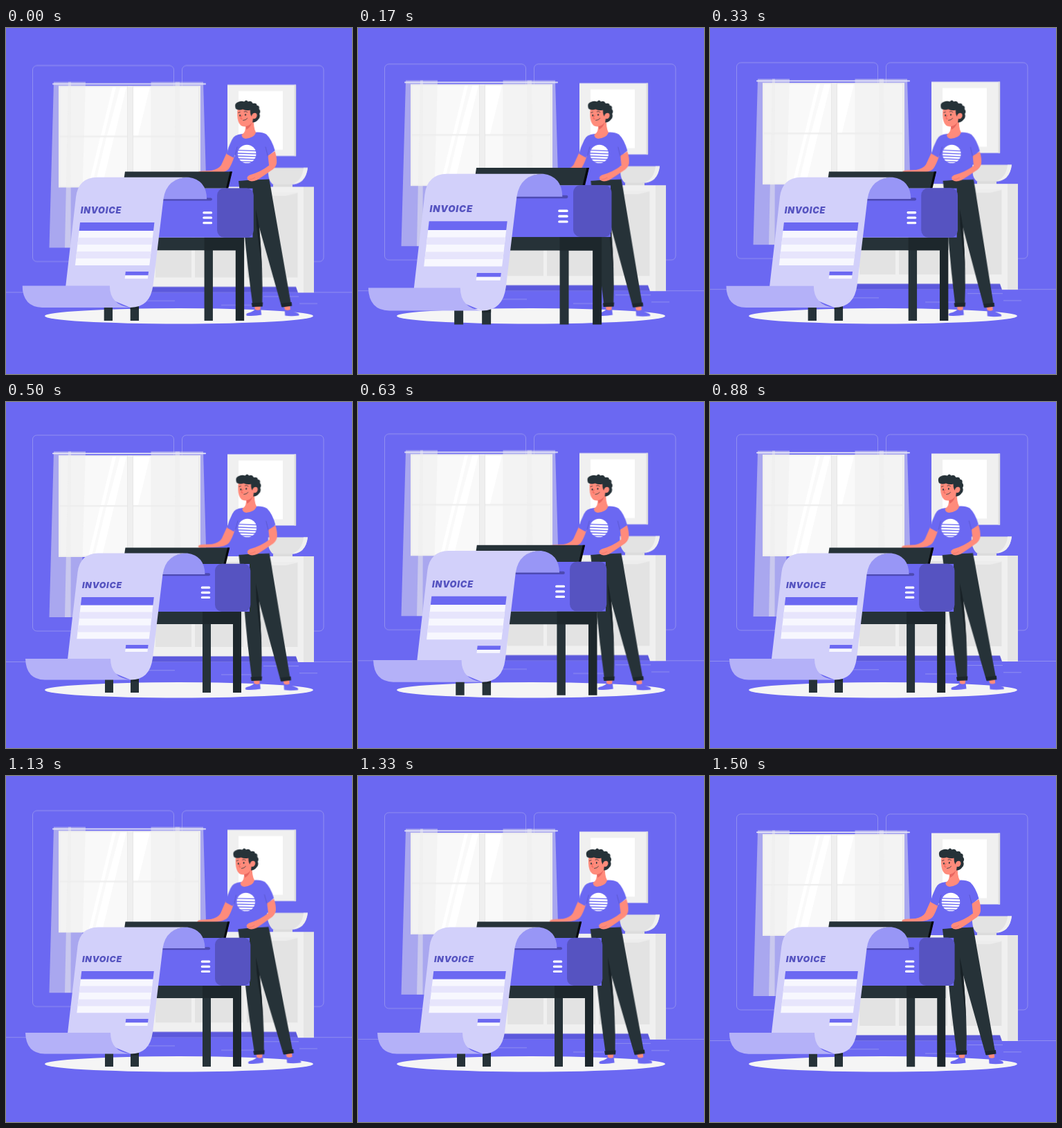
Recreate the animation shown at these times as an HTML page. Size 500 by 500 pixels, loop 1.54 s.

```html
<!DOCTYPE html>
<html lang="en">
<head>
<meta charset="utf-8">
<title>Invoice printing</title>
<style>
  html, body { margin: 0; width: 100%; height: 100%; overflow: hidden; background: #6b68f2; }
  svg { display: block; width: 100vw; height: 100vh; }
  .room, .man, .printer { animation: 1540ms linear -41.6ms infinite; }
  .room { animation-name: float; }
  .man { animation-name: sway; transform-origin: 351px 260px; }
  .printer { animation-name: beat; transform-origin: 190.5px 315px; }
  @keyframes float {
    0%, 100% { transform: translateY(0); }
    50% { transform: translateY(-10px); }
  }
  @keyframes sway {
    0%, 100% { transform: rotate(0deg); }
    25% { transform: rotate(1deg); }
    75% { transform: rotate(-1deg); }
  }
  @keyframes beat {
    0%, 30%, 40%, 60%, 100% { transform: scale(1); }
    10%, 50% { transform: scale(1.1); }
  }
  .line { fill: none; stroke: #ebebeb; stroke-width: .6; stroke-opacity: .5; }
  .curtain { fill: #ededed; fill-opacity: .48; }
  .purple { fill: #6b68f2; }
  .skin { fill: #ff8b7b; }
  .dark { fill: #263238; }
  .deep { fill: #1d272c; }
  .ink { fill: none; stroke: #263238; stroke-width: .8; stroke-linecap: round; }
  .fold { fill: none; stroke: #4f4cb8; stroke-width: .6; stroke-linecap: round; }
  .white { fill: #fff; }
  .title { font: italic 900 12.4px Inter, Arial, sans-serif; letter-spacing: .75px; fill: #5553c0; }
</style>
</head>
<body>
<svg viewBox="0 0 500 500" preserveAspectRatio="none">
  <rect class="purple" width="500" height="500"/>

  <g class="room">
    <g class="line">
      <rect x="38.5" y="55" width="204" height="283" rx="6"/>
      <rect x="254.5" y="55" width="204.500" height="283" rx="6"/>
      <path d="M0 382.500H500M190 394.800H244M311 401H358M372 388.600H423M424 398.800H450"/>
    </g>

    <!-- window -->
    <rect x="76" y="84" width="205" height="147" fill="#efefef"/>
    <g fill="#f9f9f9">
      <path d="M78 86H175V156H78ZM184 86H278V156H184ZM78 158.500H175V229H78ZM184 158.500H278V229H184Z"/>
    </g>
    <g class="white">
      <path d="M154 86H159L142 156H137ZM165 86H174L157 156H146ZM136 158.500H141L124 229H119ZM145 158.500H156L139 229H128Z"/>
      <path d="M184 86H208L191 156H184Z"/>
    </g>
    <path d="M175.500 84V231M183.500 84V231M278.500 86V229" stroke="#e4e4e4" stroke-width=".7"/>
    <path class="curtain" d="M69 78.500H115L108 318H62.500Z"/>
    <path class="curtain" d="M90 78.500H94L93.500 318H85Z"/>
    <path class="curtain" d="M209.500 78.500H285L292 318H209.500Z"/>
    <path class="curtain" d="M244.500 78.500H251L253 318H243Z"/>
    <rect x="67" y="80.600" width="222" height="1.600" rx=".8" fill="#e9e9f6"/>

    <!-- picture -->
    <rect x="320" y="82.500" width="99" height="103" fill="#f0f0f0"/>
    <rect x="416.500" y="82.500" width="2.700" height="103" fill="#dedede"/>
    <rect class="white" x="336" y="91.500" width="64" height="85"/>

    <!-- sideboard -->
    <rect x="200" y="374" width="222" height="8.500" fill="#5c59dc"/>
    <path d="M195 230H445V383H422L419 374.500H195Z" fill="#f0f0f0"/>
    <path d="M430 230H445V383H430Z" fill="#e5e5e5"/>
    <path d="M216 238H268V361H216ZM273 238H343V361H273ZM348 238H421.500V361H348Z" fill="#e3e3e3"/>
    <path d="M378 238H421.500V239L405 243H378Z" fill="#ededed"/>

    <!-- bowl -->
    <path d="M386 230V226.500Q400 223 414 226.500V230Z" fill="#dcdcdc"/>
    <path d="M376 202.500H436Q433 226.500 412 226.500H386Q379 222 376 202.500Z" fill="#e3e3e3"/>
    <path d="M430 202.500H436Q433 226.500 412 226.500Q428 222 430 202.500Z" fill="#f0f0f0"/>
  </g>

  <ellipse cx="250" cy="416.300" rx="194" ry="11.200" fill="#f5f5f5"/>

  <g class="man">
    <!-- feet -->
    <path class="skin" d="M359.500 400H368.500L367.500 409H360ZM402 400H410.500L411.500 409H403.500Z"/>
    <path class="purple" d="M368.500 406.500L369.500 414.500Q360 416.500 348 415.700Q346 412.500 351 411.500Q357 410 360 406.500Q364 409 368.500 406.500Z"/>
    <path class="purple" d="M403 406.500Q407 409 411.500 406.500Q415 410 420 411.200Q425 412.500 423.500 415.500Q412 417 403.500 415.500Z"/>
    <!-- trousers -->
    <path class="dark" d="M336 221L380 217.500Q383 232 385.500 248L412.500 401L398.500 403L366 288Q372 350 370.500 401L357 402.500Q349 345 344 290Z"/>
    <path d="M361 262Q364 275 366 288Q369 325 370 350L362 285Z" fill="#182126"/>
    <path class="deep" d="M355 397.500L371.500 396.500L371 402.500L356 403ZM397.500 398L413 396L413.500 401.500L399 403.500Z"/>
    <!-- arms and shirt -->
    <path class="skin" d="M319 180L330 185Q326 198 321.500 204Q317 209.500 300 210.500L279 211.500Q275.500 209.500 279 207.500Q285 206 297 206Q307 204 311 198Z"/>
    <path class="purple" d="M341 153Q329 154 326 162Q321 172 318.500 182L328.500 187.500L331 183Q330 205 322.500 221L380 218.500Q377 200 379 185L388.500 177Q384 161 376 153.500Q369 149.500 357 151Z"/>
    <path class="fold" d="M331 184L334 172M378.500 186L375 172M379 208L366 215"/>
    <path class="skin" d="M378.500 184.500L388.500 178Q391.500 187 391 195Q390 202 383 206Q373 213 363 219.500Q354 223.500 349.500 219.500Q346.500 215 352 212.500Q368 208 380 198.500Z"/>
    <path d="M351 219Q356 219 360 216" fill="none" stroke="#e06a61" stroke-width=".6"/>
    <!-- shirt print -->
    <circle class="white" cx="348" cy="182" r="13.300"/>
    <path d="M333 176.700L363 177.600M333 181L363 181.900M333 185L363 185.900M333 189L363 189.900M333 192.800L363 193.700" stroke="#6b68f2" stroke-width="1.300"/>
    <!-- head -->
    <path class="skin" d="M346 138L358 130Q357 144 361 151Q358 159 346 160Q340 159 340.500 154Q347 151 346 138Z"/>
    <path d="M346 141Q352 140 355.500 136Q353 144 347 147Z" fill="#e8665f"/>
    <path class="skin" d="M334.500 116Q333 127 335.500 135Q338 143 345.500 142.500Q355 141 358 130Q360 118 354 113Q340 108 334.500 116Z"/>
    <path class="dark" d="M332 117Q329 110 334 107.500Q339 104.500 344 106.500Q347 102.500 349.500 106.500Q354 104 356.500 109Q362 107.500 362.500 112Q366.500 112 365.500 117Q368.500 120 366 124Q368 129 364 132.500Q361 136.500 356 136.500L357 129Q352.500 128 352.500 118.500Q347 120 342 117.500Q336 119.500 332 117Z"/>
    <path class="skin" d="M355 126Q357 121.500 361 123Q364 126 361 130Q358 132.500 355 130Z"/>
    <ellipse class="dark" cx="338" cy="126.500" rx=".9" ry="1.400"/>
    <ellipse class="dark" cx="345.800" cy="125.500" rx=".9" ry="1.400"/>
    <path class="ink" d="M335.500 122.500L338 121.500M344 121Q346.500 119.800 348.500 121.500M342.500 133.500Q346.500 133.500 348.500 130.500"/>
    <path d="M341 126Q338.500 130 339 131Q340 132 341.500 131.200" fill="none" stroke="#e8504a" stroke-width=".8"/>
  </g>

  <g class="printer">
    <!-- stand -->
    <path class="dark" d="M143 398H155V420H143ZM284 303H296V420H284ZM180 398H192V420H180ZM200 303H340V321H200Z"/>
    <path class="deep" d="M284 303H340V420H328V321H284ZM180 398H192V404H180Z"/>
    <!-- body -->
    <path class="dark" d="M172.500 210.500H323L317 234H169Z"/>
    <path d="M320 210.500H323.300L317.700 234H314.500Z" fill="#06090b"/>
    <rect class="purple" x="205" y="234" width="147" height="69"/>
    <rect x="302" y="233.700" width="51.300" height="69.300" rx="10" fill="#5653c1"/>
    <rect x="220" y="247.300" width="75" height="4" rx="2" fill="#4d4ab2"/>
    <g class="white">
      <rect x="281.800" y="266.500" width="13.400" height="3.200" rx="1.500"/>
      <rect x="281.800" y="273.700" width="13.400" height="3.200" rx="1.500"/>
      <rect x="281.800" y="280.900" width="13.400" height="3.200" rx="1.500"/>
    </g>
    <!-- sheet -->
    <path d="M226 249Q229 219 262 218.500Q287 222 287.500 249Z" fill="#9896f6"/>
    <path d="M89 372L103.500 246Q107 219 133 218.500H262Q231 219 226.500 249L212 370Q208 401.500 180 401.500L140 385Z" fill="#d2d0fa"/>
    <path d="M28 371H151Q151 398 180 401.500H56Q29 401 28 371Z" fill="#b4b1f8"/>
    <text class="title" x="110" y="269.300">INVOICE</text>
    <g transform="translate(0 282) skewX(-6.6)">
      <rect class="purple" x="109.300" width="104.500" height="11.700"/>
      <rect x="109.300" y="11.700" width="104.500" height="48.500" fill="#f7f7fe"/>
      <path d="M109.300 21.400h104.500v9.700h-104.500zM109.300 40.800h104.500v9.700h-104.500z" fill="#e7e5fc"/>
      <rect class="purple" x="181.300" y="69" width="32.300" height="5.400"/>
      <rect x="181.300" y="74.400" width="32.300" height="4.600" fill="#f7f7fe"/>
    </g>
  </g>
</svg>
</body>
</html>
```
